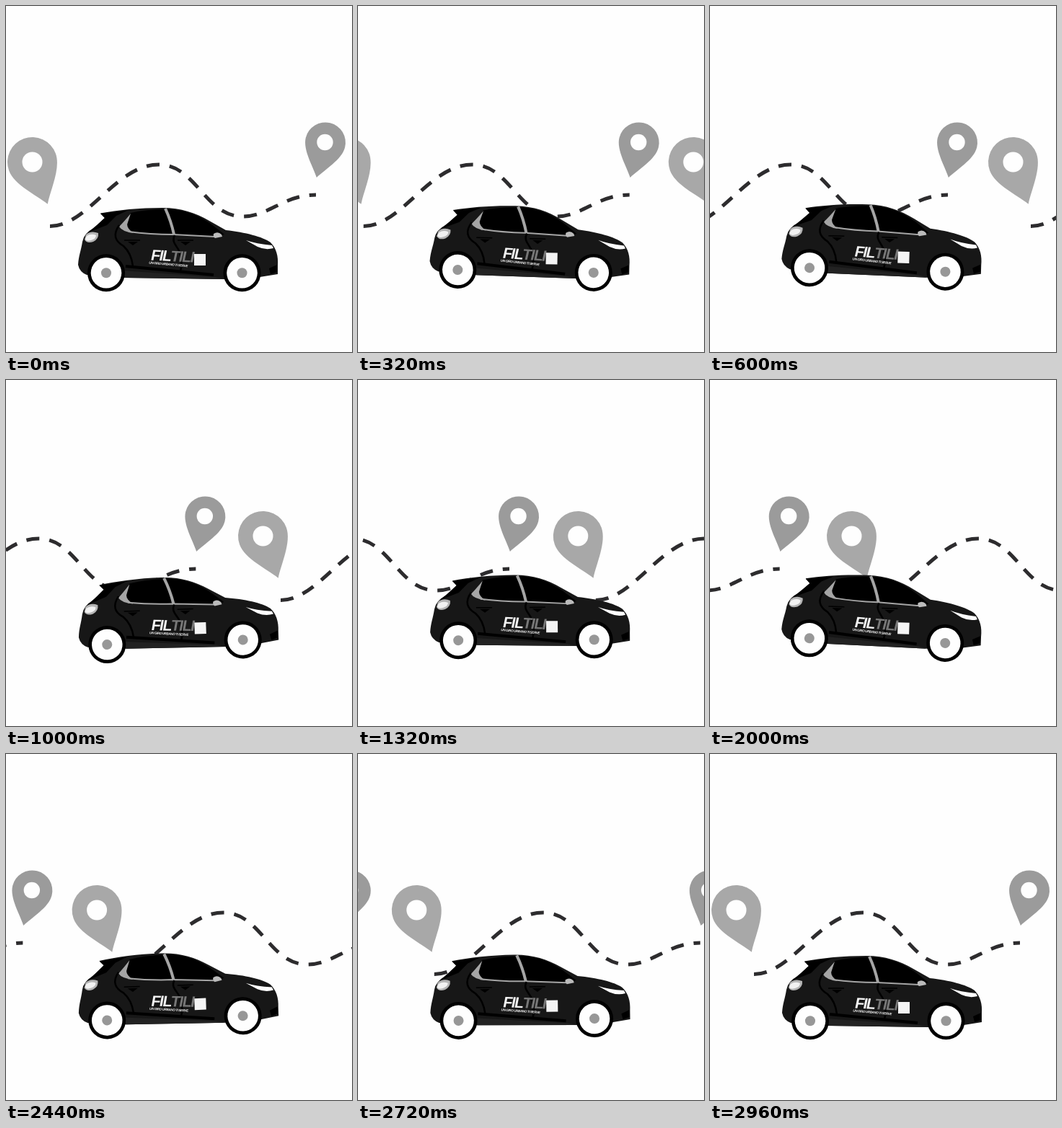
These frames come from a looping animation (480x480 px, 3000 ms). An HTML page:

```html
<!DOCTYPE html>
<html lang="it">
<head>
<meta charset="utf-8">
<title>Car trip</title>
<style>
html, body { margin: 0; width: 100%; height: 100%; overflow: hidden; background: #fefefe; }
svg { display: block; width: 100vw; height: 100vh; }
text { font-family: "Liberation Sans", Arial, sans-serif; font-weight: 700; }
</style>
</head>
<body>
<svg viewBox="0 0 480 480">
  <defs>
    <g id="route">
      <path d="M61 305.5C114 305.5 152 220 212 220C264 220 276 292 328 292C365 292 385 262 430 262"
        pathLength="425" stroke-dasharray="18 14" fill="none" stroke="#2d2c2e" stroke-width="5"/>
      <path class="pin" data-pin="36.5 216.5 34.5 62 -20" fill="#a8a8a8"/>
      <circle cx="36.5" cy="216.5" r="14" fill="#fefefe"/>
      <path class="pin" data-pin="443 189.5 28 50 14" fill="#9b9b9b"/>
      <circle cx="442.5" cy="189" r="11.2" fill="#fefefe"/>
    </g>
    <g id="wheel">
      <circle r="26" fill="#000"/>
      <circle r="21.3" fill="#fefefe"/>
      <circle r="7" fill="#979797"/>
    </g>
  </defs>

  <use id="first" href="#route"/>
  <use id="second" href="#route"/>

  <g id="car">
    <path fill="#171717" d="M131 287.5C155 283 185 280 217 280C243 280 263 287 282 298L305 311C332 314 356 320 367 328C375 336 378 347 377 360V372L352 376L303 379L165 377L112 373Q102 369 100 359C101 345 104 340 106 327Q108 315 122 308L137 294Z"/>
    <path fill="#222" d="M160 367L290 376L303 379L165 377Z"/>
    <path fill="#000" d="M131 288L170 283L153 291L140 304L114 314L126 304L137 294Z"/>

    <path fill="#000" d="M173 287Q195 282 220 282L232 317Q195 316 172 312Q165 305 173 287Z"/>
    <path fill="#000" d="M224 282C248 282 266 290 284 302L303 317L290 320L236 318Z"/>
    <g fill="none" stroke="#a5a5a5">
      <path d="M221 281Q229 298 233 317" stroke-width="4"/>
      <path d="M170 313Q200 317 232 317L290 320" stroke-width="2"/>
    </g>
    <path fill="#a5a5a5" d="M173 288L168 303Q168 309 177 315Q161 313 157 306Q163 300 173 288Z"/>
    <path fill="#bbb" d="M288 316Q294 312 299 317L300 320L290 322Q287 320 288 316Z"/>

    <g fill="none" stroke="#000" stroke-width="2.5">
      <path d="M157 304C148 317 151 326 163 333Q174 343 176 361"/>
      <path d="M234 318C228 329 240 334 242 345Q245 357 242 368"/>
      <path d="M166 361L288 373" stroke-width="4"/>
      <path d="M164 325H186M238 325H260" stroke-width="1.5"/>
    </g>
    <g fill="#000">
      <path d="M169 327H183L176 332Z"/>
      <path d="M242 327H256L249 332Z"/>
      <path d="M365 364L376 359V369L367 372Z"/>
    </g>

    <path fill="#b5b5b5" d="M111 317Q118 311 128 315Q129 323 121 327Q112 330 109 324Z"/>
    <path fill="#f2f2f2" d="M112 319Q118 315 125 318Q125 323 118 325Q111 327 110 323Z"/>
    <path fill="#fefefe" d="M333 325Q347 330 369 332L371 336Q360 339 349 334Z"/>

    <g transform="translate(200 352.5) rotate(3) skewX(-9)">
      <text font-size="21" letter-spacing="-1.4" fill="#f4f4f4">FIL<tspan fill="#777">TILI</tspan></text>
    </g>
    <rect x="261" y="344" width="16" height="16" fill="#f4f4f4"/>
    <g transform="translate(198 357.5) rotate(5) skewX(-9)">
      <text font-size="4.6" letter-spacing="-.4" fill="#f4f4f4">UN GIRO URBANO TI SERVE</text>
    </g>

    <use href="#wheel" x="139" y="370.3"/>
    <use href="#wheel" x="327.5" y="370.3"/>
  </g>
</svg>
<script>
const LOOP = 3000, STEP = 40, REST = 2960;
const LIFT = [[0, 0], [600, 4.3], [1000, 6.6], [1320, 9.6], [1650, 10], [2000, 8.6], [2440, 4], [REST, 0]];
const byId = id => document.getElementById(id);
const [first, second, car] = ["first", "second", "car"].map(byId);

// Teardrop: a round head narrowing to a tip, turned around the head.
document.querySelectorAll(".pin").forEach(pin => {
  const [x, y, r, length, turn] = pin.dataset.pin.split(" ").map(Number);
  pin.setAttribute("d", `M0 ${length}C${-.3 * r} ${1.3 * r} ${-r} ${.62 * r} ${-r} 0` +
    `A${r} ${r} 0 0 1 ${r} 0C${r} ${.62 * r} ${.3 * r} ${1.3 * r} 0 ${length}Z`);
  pin.setAttribute("transform", `translate(${x} ${y}) rotate(${turn})`);
});

function interpolate(keys, t) {
  const i = Math.max(1, keys.findIndex(([time]) => time >= t));
  const [t0, v0] = keys[i - 1], [t1, v1] = keys[i];
  return v0 + (v1 - v0) * (t - t0) / (t1 - t0);
}

function draw(time) {
  let t = Math.floor(time % LOOP / STEP) * STEP;
  if (t >= REST) t = 0;
  first.setAttribute("transform", `translate(${-t / 6} 0)`);
  second.setAttribute("transform", `translate(${480 - .16 * t} 0)`);

  // Two rocking cycles per loop, each with a soft start and end.
  const phase = 4 * Math.PI * t / LOOP;
  const tilt = 1.55 * (Math.sin(phase) - .5 * Math.sin(2 * phase));
  car.setAttribute("transform", `translate(0 ${-interpolate(LIFT, t)}) rotate(${tilt} 235 335)`);
}

const start = performance.now();
function tick() {
  draw(performance.now() - start);
  requestAnimationFrame(tick);
}
tick();
</script>
</body>
</html>
```
